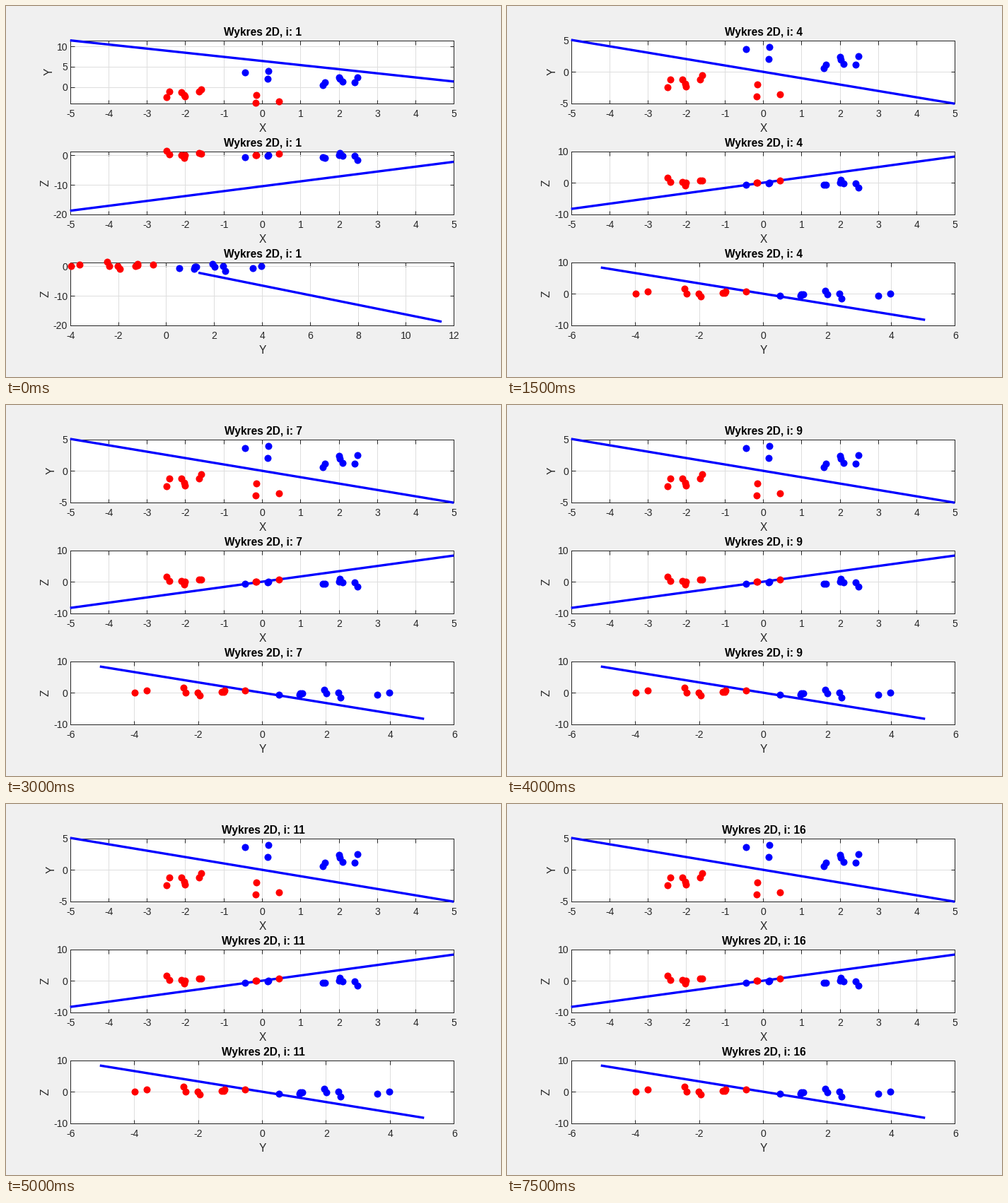
Recreate the animation shown at these times as a matplotlib script. Size 700 px wide and 525 px high, loop 8 s.

```python
import math
import numpy as np
import matplotlib.pyplot as plt
from matplotlib.animation import FuncAnimation

W, H, DPI = 700, 525, 100
PX = 72 / DPI  # points per pixel
LEFT, RIGHT = 90.7, 633.3
FIRST_TOP, PANEL_PITCH, HEIGHT = 48.6, 157, 89
INK = "#262626"
PAIRS = ("XY", "XZ", "YZ")
TICK_STEP = {"X": 1, "Y": 5, "Z": 10}

plt.rcParams["font.family"] = "Liberation Sans"
plt.rcParams["axes.linewidth"] = PX

# The red class is the blue one mirrored through the origin.
blue = np.array([
    (-0.45, 3.61, -0.65), (0.17, 3.97, 0), (0.14, 2.02, -0.1),
    (1.59, 0.54, -0.7), (1.64, 1.18, -0.75), (2, 2.38, 0), (2.03, 1.94, 0.9),
    (2.1, 1.27, -0.15), (2.41, 1.19, -0.25), (2.49, 2.46, -1.5),
])
classes = {"red": dict(zip("XYZ", -blue.T)), "blue": dict(zip("XYZ", blue.T))}

fig = plt.figure(figsize=(W / DPI, H / DPI), dpi=DPI, facecolor="#f0f0f0")


def put(x, y, text, size, ha="center", color=INK, **style):
    """Write text with its baseline at a pixel position measured from the top."""
    fig.text(x / W, 1 - y / H, text, size=size * PX, ha=ha, va="baseline",
             color=color, **style)


def label_width(text):
    return sum(4.7 if c == "-" else 7.8 for c in text)


def widen(limits, step):
    low, high = limits
    return math.floor(low / step) * step, math.ceil(high / step) * step


def ticks_between(limits, step):
    low, high = limits
    return range(math.ceil(low / step) * step, math.floor(high) + 1, step)


def state(i):
    """Axis limits and separating line; the fit settles after one step."""
    x = np.array([-5, 5])
    line = {"X": x, "Y": -1.014 * x, "Z": 1.665 * x}
    limits = {"X": (-5, 5), "Y": (-5, 5), "Z": (-10, 10)}
    if i == 0:
        line["Y"] = line["Y"] + 6.42
        line["Z"] = line["Z"] - 10.5
        limits.update(Y=(-4, 11.5), Z=(-20, 1.4))
    return limits, line


def draw_panel(top, pair, limits, line, title):
    a, b = pair
    bottom = top + HEIGHT
    step = 2 if a == "Y" else TICK_STEP[a]
    xlim, ylim = widen(limits[a], step), limits[b]
    xticks = ticks_between(xlim, step)
    yticks = ticks_between(ylim, TICK_STEP[b])

    ax = fig.add_axes([LEFT / W, 1 - bottom / H, (RIGHT - LEFT) / W, HEIGHT / H])
    ax.set(xlim=xlim, ylim=ylim, xticks=xticks, yticks=yticks)
    ax.set_axisbelow(True)
    ax.grid(color="#dedede", lw=PX)
    ax.tick_params(direction="in", length=5.5 * PX, width=PX, color=INK,
                   top=True, right=True, labelbottom=False, labelleft=False)
    for spine in ax.spines.values():
        spine.set_color(INK)

    ax.plot(line[a], line[b], color="blue", lw=3.33 * PX, zorder=3,
            clip_on=False, solid_capstyle="butt")
    for color, points in classes.items():
        ax.plot(points[a], points[b], "o", color=color, ms=10 * PX,
                mew=0, clip_on=False, zorder=4)

    for t in xticks:
        x = LEFT + (t - xlim[0]) / (xlim[1] - xlim[0]) * (RIGHT - LEFT)
        put(x + 0.5, bottom + 19.5, str(t), 14)
    for t in yticks:
        y = bottom - (t - ylim[0]) / (ylim[1] - ylim[0]) * HEIGHT
        put(87, y + 5.5, str(t), 14, ha="right")

    put(363.5, top - 6.5, title, 15.5, color="black", weight="bold")
    put(363, bottom + 40, a, 15.5)
    widest = max(label_width(str(t)) for t in yticks)
    put(81 - widest, top + HEIGHT / 2, b, 15.5, rotation=90,
        rotation_mode="anchor")


def update(i):
    fig.clear()
    limits, line = state(i)
    for k, pair in enumerate(PAIRS):
        draw_panel(FIRST_TOP + k * PANEL_PITCH, pair, limits, line,
                   f"Wykres 2D, i: {i + 1}")
    return []


anim = FuncAnimation(fig, update, frames=16, interval=500, repeat=True,
                     repeat_delay=0, init_func=lambda: [])
plt.show()
```
